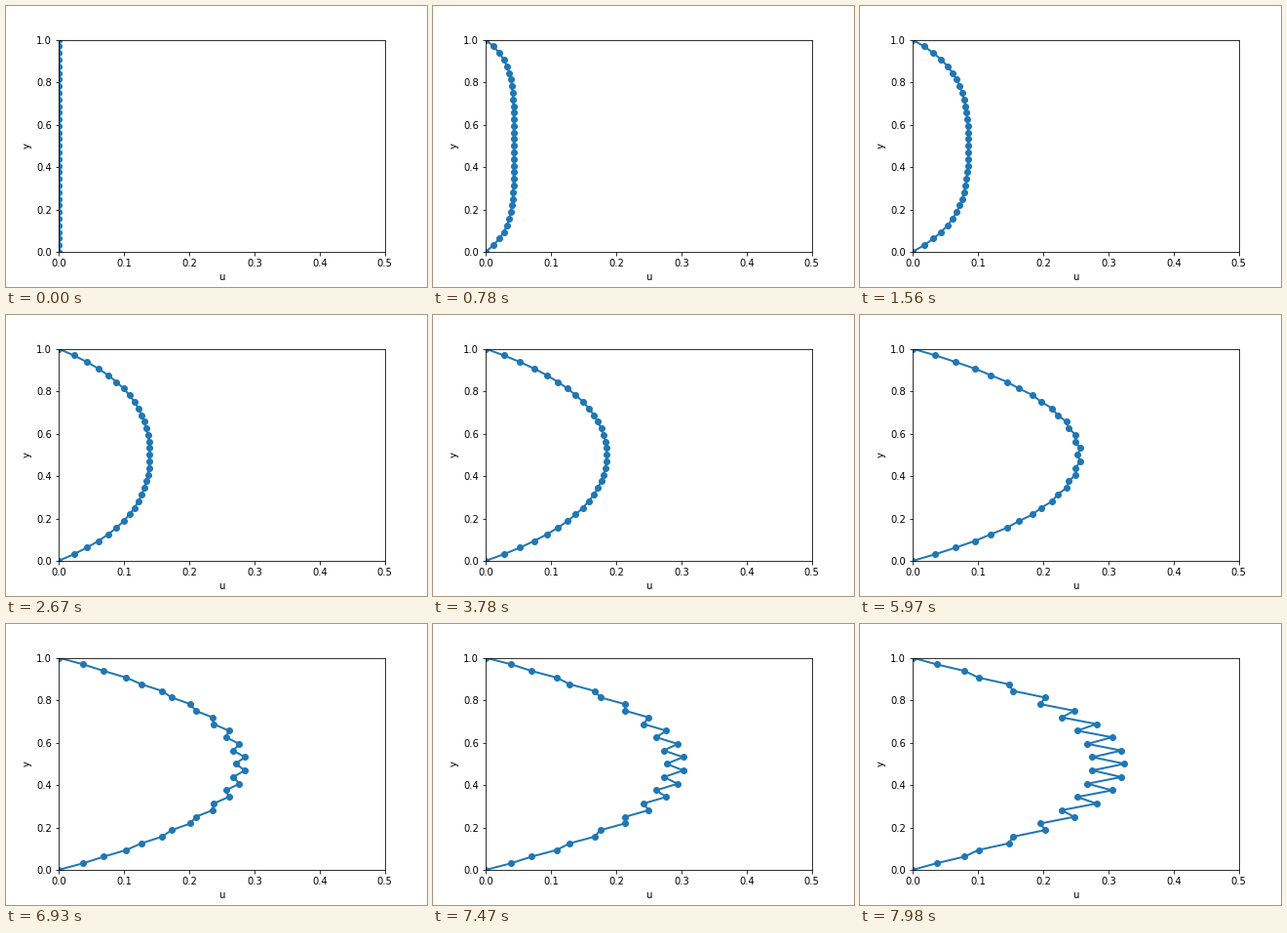
Write a matplotlib script that moves like this. It is 432x288 px and loops after 8 s.

```python
import numpy as np
import matplotlib.pyplot as plt
from matplotlib.animation import FuncAnimation

# Channel flow started from rest, explicit scheme just past its stability limit
CELLS = 32
STEPS = 266
NU = 0.3
FORCE = 1.0
R = 0.51                      # nu * dt / h^2
STEP_MS = 30
TICK_MS = 20
LOOP_MS = 8000

y = np.linspace(0, 1, CELLS + 1)
dt = R / (NU * CELLS**2)


def solve():
    u = np.zeros((STEPS + 1, CELLS + 1))
    for n in range(STEPS):
        bend = u[n, 2:] - 2 * u[n, 1:-1] + u[n, :-2]
        u[n + 1, 1:-1] = u[n, 1:-1] + FORCE * dt + R * bend
    return u


profiles = solve()

fig, ax = plt.subplots(figsize=(6, 4), dpi=72)
fig.subplots_adjust(left=0.125, right=0.9, bottom=0.125, top=0.88)
ax.set(xlim=(0, 0.5), ylim=(0, 1), xlabel="u", ylabel="y")
line, = ax.plot([], [], "o-", color="#1f77b4", lw=2, ms=6)


def draw(i):
    step = min((i * TICK_MS + TICK_MS // 2) // STEP_MS, STEPS)
    line.set_data(profiles[step], y)
    return line,


def init():
    return draw(0)


anim = FuncAnimation(fig, draw, init_func=init, frames=LOOP_MS // TICK_MS,
                     interval=TICK_MS, repeat=True, repeat_delay=0, blit=False)
plt.show()
```
